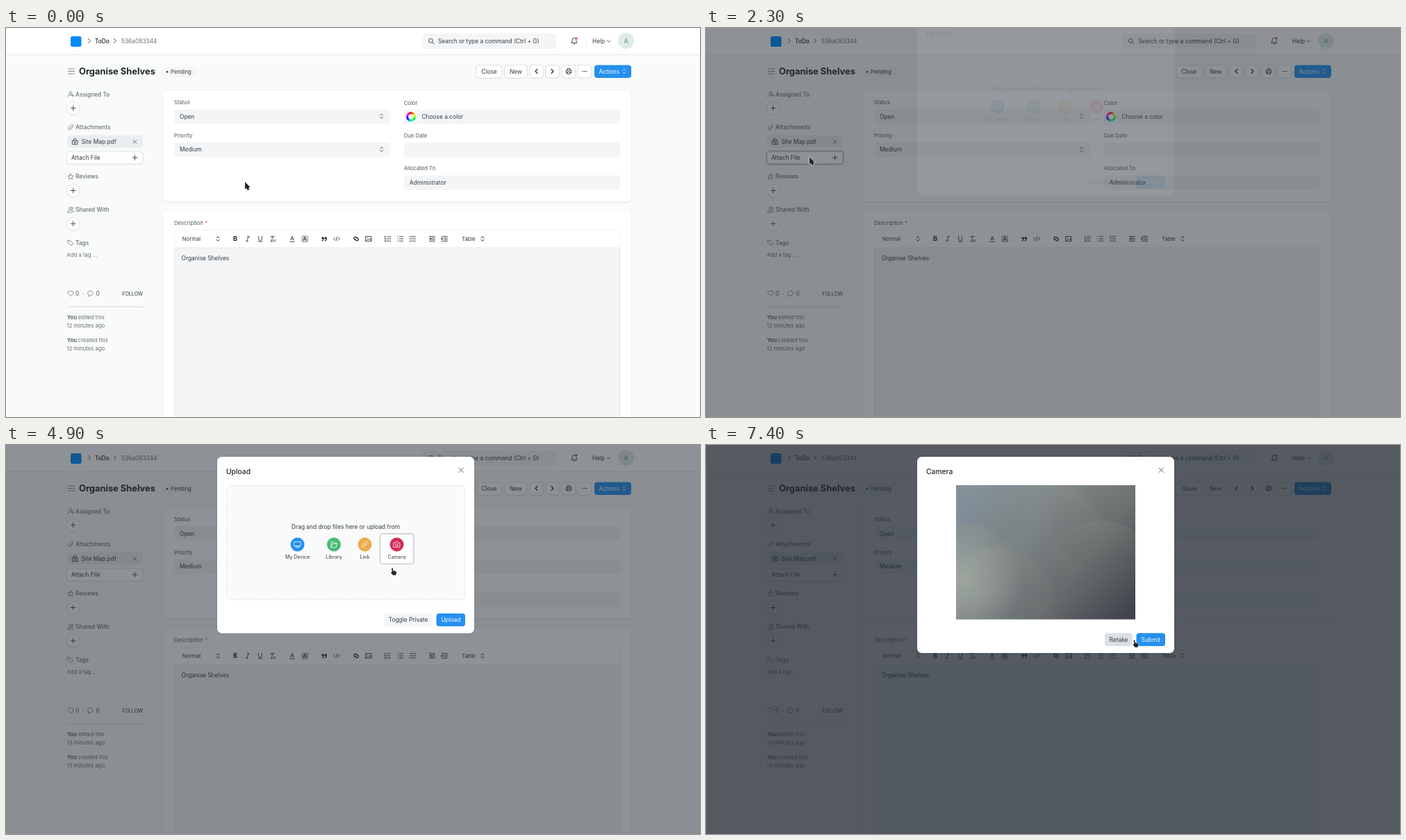
Write an HTML page with a canvas that moves like this. It is 999x561 px and loops after 8 s.

```html
<!DOCTYPE html>
<html lang="en">
<head>
<meta charset="utf-8">
<title>Upload dialog</title>
<style>
html, body { margin: 0; width: 100%; height: 100%; overflow: hidden; background: #f9fafa; }
canvas { display: block; width: 999px; height: 561px; }
</style>
</head>
<body>
<canvas id="stage" width="999" height="561"></canvas>
<script>
const W = 999, H = 561, LOOP = 8000, STEP = 100;
const stage = document.getElementById('stage').getContext('2d');
const layer = Object.assign(document.createElement('canvas'), { width: W, height: H }).getContext('2d');
let g = stage;

const INK = '#1f272e', DARK = '#333c44', LABEL = '#505a62', MUTED = '#687178';
const LINE = '#e2e6e9', FIELD = '#f4f5f6', BLUE = '#2490ef', WHITE = '#fff';
const MD = 8.36, SM = 7.72, XS = 7.07;
const TASK = 'Organise Shelves';

const CHEVRONS = 'M-2-1.3L0-3.2L2-1.3M-2 1.3L0 3.2L2 1.3';
const RIGHT = 'M-1.5-3L1.5 0L-1.5 3', LEFT = 'M1.5-3L-1.5 0L1.5 3';
const PLUS = 'M-3.5 0H3.5M0-3.5V3.5', CROSS = 'M-2.6-2.6L2.6 2.6M2.6-2.6L-2.6 2.6';
const CLIP = 'M3.6-1L-.4 3A2 2 0 0 1-3.3 .1L.7-3.6A1.4 1.4 0 0 1 2.7-1.6L-1.2 2';
const PERSON = 'M-1.9-2A1.9 1.9 0 1 1 1.9-2A1.9 1.9 0 1 1-1.9-2M-4 4V3A2.2 2.2 0 0 1-1.8 1H1';

const clamp = (v, a = 0, b = 1) => Math.min(b, Math.max(a, v));

function text(s, x, y, size = MD, color = DARK, weight = 400, align = 'left') {
  g.font = `${weight} ${size}px Inter, "Liberation Sans", sans-serif`;
  g.fillStyle = color;
  g.textAlign = align;
  g.fillText(s, x, y + size * .36);
}

function box(x0, y0, x1, y1, r, fill, border, width = .8) {
  g.beginPath();
  g.roundRect(x0, y0, x1 - x0, y1 - y0, r);
  if (fill) { g.fillStyle = fill; g.fill(); }
  if (border) { g.strokeStyle = border; g.lineWidth = width; g.stroke(); }
}

function disc(x, y, r, fill, border) {
  box(x - r, y - r, x + r, y + r, r, fill, border);
}

function icon(d, x, y, color = DARK, width = .9) {
  g.save();
  g.translate(x, y);
  g.strokeStyle = color;
  g.lineWidth = width;
  g.lineCap = g.lineJoin = 'round';
  g.stroke(new Path2D(d));
  g.restore();
}

function shadowed(alpha, blur, draw) {
  g.save();
  g.shadowColor = `rgba(25,39,52,${alpha})`;
  g.shadowBlur = blur;
  g.shadowOffsetY = .6;
  draw();
  g.restore();
}

function button(x0, x1, y0, y1, label, fill = WHITE, color = DARK) {
  const draw = () => box(x0, y0, x1, y1, 4, fill, fill === WHITE ? '#dfe3e6' : null, .7);
  fill === WHITE ? shadowed(.1, 1.5, draw) : draw();
  if (label) text(label, (x0 + x1) / 2, (y0 + y1) / 2, MD, color, 400, 'center');
}

const ring = (x0, y0, x1, y1, r, color = '#d3d7da') => box(x0, y0, x1, y1, r, null, color, 2);

function navbar() {
  box(0, 0, W, 38, 0, WHITE);
  box(0, 38, W, 39, 0, '#e6e9ec');
  box(93, 12, 108.5, 27, 2.5, '#0089ff');
  icon(RIGHT, 120, 18.5);
  text('ToDo', 128, 18.5, MD, INK, 500);
  icon(RIGHT, 157, 18.5);
  text('536a083344', 166, 18.5, MD, MUTED);
  box(599, 8, 792, 30, 4, FIELD);
  icon('M-3.6-.6A3 3 0 1 1 2.4-.6A3 3 0 1 1-3.6-.6M1.6 1.6L4 4', 612, 19);
  text('Search or type a command (Ctrl + G)', 622, 19);
  icon('M-4 2.8H4L2.9 1.2V-1.2A2.9 2.9 0 0 0-2.9-1.2V1.2ZM-1 4.4H1', 818, 18.5);
  disc(821, 14.8, 1.5, '#e24c4c');
  box(835, 11, 835.7, 27, 0, LINE);
  text('Help', 844, 18.5);
  icon('M-2.3-1.1L0 1.2L2.3-1.1', 867.5, 19);
  disc(892.5, 18.5, 11.5, '#e1ebe6');
  text('A', 892.5, 18.7, 9, '#4d9a76', 400, 'center');
}

function heading() {
  icon('M-4.5-3.5H4.5M-4.5 0H4.5M-4.5 3.5H4.5', 94, 62.5, MUTED, .8);
  text(TASK, 105, 62.2, 12.86, INK, 700);
  box(224, 56, 274, 70.5, 4, FIELD);
  disc(232, 63.3, 1.3, DARK);
  text('Pending', 237, 63, SM, DARK);
  button(677, 714, 53.5, 72, 'Close');
  button(718, 750, 53.5, 72, 'New');
  for (const x of [754, 777, 800, 823]) button(x, x + 19.5, 53.5, 72);
  icon(LEFT, 763.5, 62.5, INK, 1.1);
  icon(RIGHT, 786.5, 62.5, INK, 1.1);
  icon('M-2-1.5V-4H2V-1.5M-2 2H-3.8V-1.5H3.8V2H2M-2 .8H2V3.8H-2Z', 810, 62.5);
  for (const dx of [-2.6, 0, 2.6]) disc(833 + dx, 62.5, .8, INK);
  button(847, 900, 53.5, 72, '', BLUE);
  text('Actions', 853.5, 62.5, MD, WHITE);
  icon(CHEVRONS, 890, 62.5, WHITE, .7);
}

function sidebar(t) {
  const rows = [['Assigned To', 95.5, PERSON + 'M3-.2V3.8M1 1.8H5'], ['Attachments', 143.2, CLIP],
    ['Reviews', 214.2, 'M0-4L1.2-1.2L4.2-1L1.9 1L2.7 4L0 2.3L-2.7 4L-1.9 1L-4.2-1L-1.2-1.2Z'],
    ['Shared With', 262, PERSON + 'M2-3.8A1.8 1.8 0 0 1 2-.3M2 1.2A2.2 2.2 0 0 1 4 3.2V4M-4 4H2V3'],
    ['Tags', 309.8, 'M-4-3.6H-.6L4 1L1 4L-4-.6ZM-2.3-2H-2']];
  for (const [label, y, d] of rows) {
    icon(d, 93, y, MUTED, .75);
    text(label, 100, y, MD, MUTED, 500);
  }
  for (const y of [115.6, 234.5, 282.2]) {
    shadowed(.08, 1.5, () => disc(96.7, y, 9.4, WHITE, '#dfe3e6'));
    icon(PLUS, 96.7, y);
  }
  box(88, 154.5, 197, 172.5, 4, '#ebeef0');
  icon('M-3.6-1H3.6V4H-3.6ZM-2-1V-2.2A2 2 0 0 1 2-2.2V-1M0 .5V2.5M-1 1.5H1', 99.3, 163.7);
  text('Site Map.pdf', 108.5, 163.5);
  icon(CROSS, 185.5, 164, LABEL, .8);
  button(87.3, 197, 178, 196, '');
  if (t >= 2100 && t < 2700) ring(87, 177.5, 198, 196.5, 5, '#bcc3c9');
  text('Attach File', 94, 187);
  icon(PLUS, 185.5, 187);
  text('Add a tag ...', 87.5, 327.3, SM, MUTED);
  icon('M0 3.8L-3.6 .2A2.2 2.2 0 0 1 0-2.6A2.2 2.2 0 0 1 3.6 .2Z', 93, 382.8, MUTED, .75);
  text('0', 100, 382.8, MD, LABEL);
  text('·', 110, 382.8, MD, LABEL);
  icon('M-2.7 2.8A3.7 3.5 0 1 1 0 3.3L-3.5 4.2Z', 122, 382.6, MUTED, .75);
  text('0', 129.5, 382.8, MD, LABEL);
  text('FOLLOW', 197, 383, XS, DARK, 400, 'right');
  box(88, 401.6, 197, 402.4, 0, '#d5dade');
  const age = `${t < 3800 ? 12 : 13} minutes ago`;
  [['edited', 417.5], ['created', 450.5]].forEach(([verb, y]) => {
    text('You', 87.7, y, SM, LABEL, 600);
    text(verb + ' this', 103.8, y, SM, MUTED);
    text(age, 87.5, y + 11.8, SM, MUTED);
  });
}

function field(label, x, y, value, dx = 7.7) {
  text(label, x - .3, y, SM, LABEL);
  box(x, y + 9.8, x + 311, y + 30.5, 4, FIELD);
  text(value, x + dx, y + 20.2);
}

function colorWheel(x, y) {
  const hues = g.createConicGradient(-Math.PI / 2, x, y);
  for (let i = 0; i <= 6; i++) hues.addColorStop(i / 6, `hsl(${i * 60} 95% 52%)`);
  disc(x, y, 7, hues);
  disc(x, y, 3.8, WHITE);
}

function toolbar() {
  const y = 304;
  text('Normal', 253.7, y, SM);
  icon(CHEVRONS, 305, y, INK, 1);
  text('B', 330, y, 9, INK, 700, 'center');
  icon('M-.6-3.2H2.6M-2.6 3.2H.6M1-3.2L-1 3.2', 348, y);
  icon('M-2.4-3.6V0A2.4 2.4 0 0 0 2.4 0V-3.6M-3 4H3', 366, y);
  icon('M-3.5-3.2H2.5M-.3-3.2L-1.6 3.4M-3.2 3.6H0M1.2 1.2L3.8 3.8M3.8 1.2L1.2 3.8', 384, y);
  icon('M-2.3 2L0-3.6L2.3 2M-1.5 .2H1.5M-3.2 4.2H3.2', 412, y);
  box(426, 300, 434.5, 308.5, 1, '#d6dade', MUTED, .6);
  icon('M-2.2 2.6L0-3L2.2 2.6M-1.4 .8H1.4', 430.2, y);
  for (const dx of [-2.1, 2.1]) {
    disc(458 + dx, 302.8, 1.6, INK);
    icon('M1.2-1Q1.4 2-.8 3', 458 + dx, y, INK, 1.2);
  }
  icon('M-2.4-2L-4.5 0L-2.4 2M2.4-2L4.5 0L2.4 2M.8-2.8L-.8 2.8', 476, y);
  icon('M-.6 1.2A2 2 0 1 1 .8-1M.6-1.2A2 2 0 1 1-.8 1', 504, y, INK, 1.3);
  icon('M-4-3.4H4V3.4H-4ZM-3.4 2.8L-1 .2L.5 1.5L2.2-.4L3.7 2.6M-2.3-1.6H-1.8', 522, y);
  const lines = 'M-1.5-3.2H4M-1.5 0H4M-1.5 3.2H4';
  icon(lines + 'M-4-4V-2.2M-4-1H-3.2L-4 .8H-3.2M-4 2.4H-3.2V4H-4', 549.5, y, INK, .8);
  icon(lines + 'M-4-3.2H-3.8M-4 0H-3.8M-4 3.2H-3.8', 567.5, y);
  icon(lines + 'M-4.5-3.2L-3.8-2.4L-2.6-4M-4.5 0L-3.8 .8L-2.6-.8M-4.5 3.2L-3.8 4L-2.6 2.4', 585.5, y, INK, .8);
  const dent = 'M-4-3.4H4M-.5-1.1H4M-.5 1.1H4M-4 3.4H4';
  icon(dent + 'M-2-1.4L-4 0L-2 1.4Z', 613.3, y);
  icon(dent + 'M-4-1.4L-2 0L-4 1.4Z', 631.3, y);
  text('Table', 656, y, SM);
  icon(CHEVRONS, 686, y, INK, 1);
}

function page(t) {
  box(0, 0, W, H, 0, '#f9fafa');
  navbar();
  heading();
  sidebar(t);
  for (const [y0, y1] of [[90, 250.3], [263.8, 600]])
    shadowed(.13, 3, () => box(226.3, y0, 900, y1, 5, WHITE));
  field('Status', 242.3, 107.5, 'Open');
  field('Priority', 242.3, 155.2, 'Medium');
  field('Color', 573, 107.8, 'Choose a color', 25.5);
  field('Due Date', 573, 155.2, '');
  field('Allocated To', 573, 202.7, 'Administrator');
  icon(CHEVRONS, 540.5, 127.3, INK, .8);
  icon(CHEVRONS, 540.5, 175, INK, .8);
  colorWheel(583, 128);
  text('Description', 242, 281.2, SM, LABEL);
  text('*', 286.3, 281.5, SM, '#e24c4c');
  box(242.5, 291, 883.7, 600, 4, WHITE, '#eceff1');
  box(242.5, 317, 883.7, 600, 0, FIELD, '#dfe3e6');
  toolbar();
  text(TASK, 252.5, 332);
}

function dim(alpha) {
  if (alpha > 0) box(0, 0, W, H, 0, `rgba(31,39,46,${alpha})`);
}

function panel(title, bottom) {
  shadowed(.1, 4, () => box(304, 17, 674, bottom, 6.5, WHITE));
  text(title, 317, 38.2, 10.29, INK, 500);
  icon('M-3.4-3.4L3.4 3.4M3.4-3.4L-3.4 3.4', 655.3, 36.2, LABEL, .9);
}

function uploadDialog(t) {
  panel('Upload', 271.5);
  g.setLineDash([2, 1.5]);
  box(317.5, 58.4, 660.8, 223, 4.5, '#f9fafa', '#d5dade', .8);
  g.setLineDash([]);
  text('Drag and drop files here or upload from', 489, 117.5, MD, DARK, 400, 'center');
  if (t >= 4300) {
    box(538.5, 128, 587, 171.5, 4, WHITE);
    ring(538.5, 128, 587, 171.5, 4);
  }
  const sources = [
    ['My Device', 419.6, BLUE, 'M-4.5-4H4.5V2H-4.5ZM-1.5 2V4M1.5 2V4M-2.8 4H2.8'],
    ['Library', 472, '#48bb74', 'M-4 3.8V-3.8H-.8L.4-2.4H3.6V-1M-4 3.8L-2.4-1H4.6L3.2 3.8Z'],
    ['Link', 516.5, '#ecac4b', 'M-.4-2L1.4-3.7A1.8 1.8 0 0 1 3.9-1.2L1.7 1A1.8 1.8 0 0 1-.8 .8M.4 2L-1.4 3.7A1.8 1.8 0 0 1-3.9 1.2L-1.7-1A1.8 1.8 0 0 1 .8-.8'],
    ['Camera', 562.5, '#d22d57', 'M-4.4-2.4H-2.4L-1.5-4H1.5L2.4-2.4H4.4V3.8H-4.4ZM-1.8 .5A1.8 1.8 0 1 1 1.8 .5A1.8 1.8 0 1 1-1.8 .5']];
  for (const [label, x, color, d] of sources) {
    disc(x, 143.5, 10, color);
    icon(d, x, 143.5, WHITE, .75);
    text(label, x, 161, XS, DARK, 400, 'center');
  }
  button(544, 614, 243, 261.5, 'Toggle Private', FIELD);
  button(619.5, 661, 243, 261.5, 'Upload', BLUE, WHITE);
}

// Soft abstract stand-in for the live camera picture.
function picture(t) {
  const s = Math.min(t, 7300) / 1000;
  const sway = Math.sin(s * 3.1) * 2.5, lift = Math.cos(s * 2.3) * 1.5;
  g.save();
  g.beginPath();
  g.rect(360, 58, 258, 193.5);
  g.clip();
  const base = g.createLinearGradient(375, 70, 605, 255);
  [[0, '#84929d'], [.35, '#7d8588'], [.65, '#696e6f'], [1, '#3d4049']].forEach(c => base.addColorStop(...c));
  box(360, 58, 618, 252, 0, base);
  g.translate(sway, lift);
  const domes = [[400, 90, 60], [575, 105, 75], [490, 140, 85], [380, 165, 50], [570, 195, 85], [420, 235, 85]];
  for (const [x, y, r] of domes) {
    const tone = g.createLinearGradient(x, y - r, x, y + r);
    tone.addColorStop(0, 'rgba(166,162,134,.14)');
    tone.addColorStop(1, 'rgba(60,70,90,.05)');
    disc(x, y, r, tone);
  }
  const glow = g.createRadialGradient(372, 195, 5, 372, 195, 85);
  glow.addColorStop(0, 'rgba(186,194,178,.5)');
  glow.addColorStop(1, 'rgba(186,194,178,0)');
  disc(372, 195, 85, glow);
  g.restore();
}

function cameraDialog(t) {
  panel('Camera', 300);
  picture(t);
  if (t < 7300) {
    if (t >= 6900) ring(602.6, 270.2, 661.9, 291, 5, '#b9dbf8');
    button(603.5, 661, 271.3, 290, 'Take Photo', BLUE, WHITE);
  } else {
    button(574, 614, 271.3, 290, 'Retake', t < 7400 ? FIELD : '#dcdfe2');
    button(619.5, 661, 271.3, 290, 'Submit', BLUE, WHITE);
  }
}

const PATH = [[500, 344, 222], [1300, 172, 166], [1400, 160, 164], [1700, 149, 186], [2600, 149, 186],
  [3500, 400, 175], [4100, 564, 138], [4800, 564, 138], [4900, 554, 177], [5200, 554, 177],
  [5300, 585, 252], [5400, 585, 252], [6100, 609.5, 285.5], [6300, 609.5, 285.5], [6800, 614.5, 281]];

function pointer(t) {
  const i = PATH.findIndex(k => k[0] > t);
  if (i === 0) return PATH[0].slice(1);
  if (i < 0) return PATH[PATH.length - 1].slice(1);
  const [t0, x0, y0] = PATH[i - 1], [t1, x1, y1] = PATH[i];
  const p = (t - t0) / (t1 - t0), e = p * p * (3 - 2 * p);
  return [x0 + (x1 - x0) * e, y0 + (y1 - y0) * e];
}

const ARROW = new Path2D('M0 0V10.3L2 9L3.8 12L6.3 10.9L5.2 8L7.4 7.4Z');
const HAND = new Path2D('M1.1 .8Q2-.4 2.9 .8L3.3 4.2L7 5Q8.4 5.6 7.9 7.5L7 10.8H3L.3 7.6Q-.6 6.3 .6 6.2L1.8 6.8Z');

function cursor(t) {
  const [x, y] = pointer(t);
  const onFile = t < 1500 && x < 196 && y < 173;
  const onSource = t > 2600 && t < 5100 && x > 538;
  const onButton = t >= 5100 && x > 601 && y > 270;
  const shape = onFile || onSource || onButton ? HAND : ARROW;
  g.save();
  g.translate(x, y);
  g.strokeStyle = 'rgba(255,255,255,.75)';
  g.lineWidth = 1.2;
  g.stroke(shape);
  g.fillStyle = '#22262b';
  g.fill(shape);
  g.restore();
}

function render(t) {
  g = stage;
  page(t);
  dim(.5 * clamp((t - 2150) / 150));
  if (t >= 5100) {
    dim(.5);
    cameraDialog(t);
  } else if (t >= 2300) {
    const age = (t < 2700 ? Math.min(t, 2500) : t) - 2290;
    const drop = 32 * Math.pow(1 - clamp(age / 300), 1.75);
    g = layer;
    g.clearRect(0, 0, W, H);
    uploadDialog(t);
    g = stage;
    g.globalAlpha = clamp(age / 150);
    g.drawImage(layer.canvas, 0, -drop);
    g.globalAlpha = 1;
  }
  cursor(t);
}

const start = performance.now();
let last = -1;
function tick() {
  const t = Math.floor(((performance.now() - start) % LOOP) / STEP) * STEP;
  if (t !== last) render(last = t);
  requestAnimationFrame(tick);
}
tick();
</script>
</body>
</html>
```
